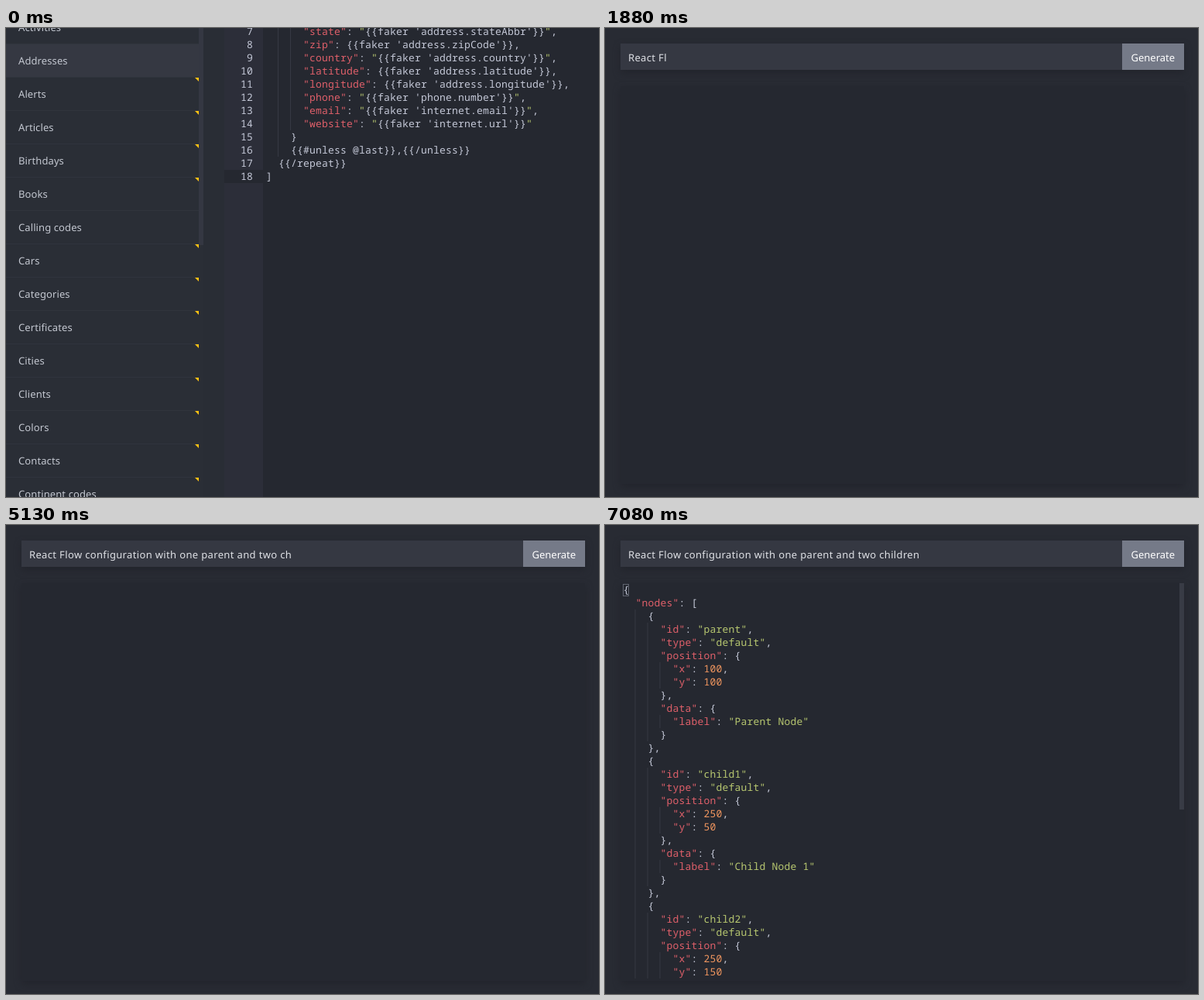
An HTML page that plays this animation: 766x605 px, repeating every 8000 ms.

```html
<!DOCTYPE html>
<html lang="en">
<head>
<meta charset="utf-8">
<title>JSON generator</title>
<style>
  html, body { margin: 0; width: 100%; height: 100%; overflow: hidden; background: #2a2e36; }
  svg { display: block; width: 766px; height: 605px; }
  text { font: 13px "Noto Sans", "Open Sans", sans-serif; fill: #c3c7d0; white-space: pre; text-rendering: geometricPrecision; }
  .item { letter-spacing: .1px; }
  .prompt { letter-spacing: .35px; fill: #dfe1e6; }
  .label { fill: #fff; }
  .code text { font-family: "Noto Sans Mono", "DejaVu Sans Mono", monospace; letter-spacing: .2px; fill: #c5c9d8; }
  .number { text-anchor: end; }
  .key { fill: #e0606a; }
  .string { fill: #b8c870; }
  .value { fill: #f0965f; }
  .plain tspan { fill: inherit; }
  .guide { fill: #363943; }
  .field { fill: #353842; }
  .shadow { filter: drop-shadow(0 4px 5px rgba(30, 32, 40, .65)); }
</style>
</head>
<body>
<svg viewBox="0 0 766 605">
  <rect width="766" height="605" fill="#2a2e36"/>

  <g id="templates">
    <rect x="255" width="27" height="605" fill="#292d35"/>
    <rect x="282" width="50" height="605" fill="#2c2e39"/>
    <rect x="332" width="434" height="605" fill="#252830"/>
    <rect x="282" y="183" width="50" height="17" fill="#252830"/>
    <rect class="field" y="20" width="249" height="43"/>
    <rect x="249" width="6" height="280" fill="#343742"/>
    <g id="list"></g>
    <g id="templateCode" class="code"></g>
  </g>

  <g id="generator">
    <rect width="766" height="605" fill="#282b33"/>
    <rect id="bar" class="field shadow" x="20" y="20" width="728" height="34"/>
    <rect class="shadow" x="20" y="75" width="728" height="513" fill="#252830"/>
    <text id="prompt" class="prompt" x="30" y="43"></text>
    <g id="button">
      <rect id="buttonFace" x="668" y="20" width="80" height="34"/>
      <text class="label" x="679.5" y="43">Generate</text>
    </g>
    <g id="spinner" fill="none" stroke-width="2">
      <circle cx="740" cy="38" r="6.3" stroke="#555963"/>
      <path d="M733.7 38A6.3 6.3 0 0 1 742 32" stroke="#b4b7bf"/>
    </g>
    <g id="result" class="code">
      <rect x="23.5" y="76.5" width="7" height="15" fill="none" stroke="#60646f"/>
    </g>
    <rect id="thumb" x="742" y="75" width="6" height="292" fill="#383b45"/>
  </g>
</svg>

<script>
const LOOP = 8000, FRAME = 90, LINE = 17, COLUMN = 8;
const $ = id => document.getElementById(id);

function add(parent, tag, attrs, content = '') {
  const el = document.createElementNS('http://www.w3.org/2000/svg', tag);
  for (const name in attrs) el.setAttribute(name, attrs[name]);
  el.textContent = content;
  return parent.appendChild(el);
}

// Sidebar
const names = ['Activities', 'Addresses', 'Alerts', 'Articles', 'Birthdays', 'Books', 'Calling codes', 'Cars',
  'Categories', 'Certificates', 'Cities', 'Clients', 'Colors', 'Contacts', 'Continent codes'];
names.forEach((name, i) => {
  const top = 43 * i - 22;
  add($('list'), 'rect', { y: top + 42, width: 249, height: 1, fill: '#30343d' });
  add($('list'), 'text', { class: 'item', x: 16, y: top + 26 }, name);
  if (i > 1 && name !== 'Calling codes')
    add($('list'), 'path', { d: `M244 ${top}h5v5z`, fill: '#fcc212' });
});

// Code listings
const TOKEN = /("[^"]*"(?=:))|("[^"{]*"|")|(\d+)|[^"\d]+/g;

function drawCode(parent, lines, x, top) {
  lines.forEach((line, i) => {
    const y = top + i * LINE;
    const indent = line.search(/\S/);
    for (let col = 2; col < indent; col += 2)
      add(parent, 'rect', { class: 'guide', x: x + col * COLUMN - 1, y, width: 1, height: LINE });
    const text = add(parent, 'text', { x: x + indent * COLUMN, y: y + 13 });
    for (const [token, key, string, value] of line.trim().matchAll(TOKEN))
      add(text, 'tspan', { class: key ? 'key' : string ? 'string' : value ? 'value' : '' }, token);
  });
}

const faker = (key, path, quote = '"') => `      "${key}": ${quote}{{faker '${path}'}}${quote}`;
const template = [
  faker('state', 'address.stateAbbr') + ',',
  faker('zip', 'address.zipCode', '') + ',',
  faker('country', 'address.country') + ',',
  faker('latitude', 'address.latitude', '') + ',',
  faker('longitude', 'address.longitude', '') + ',',
  faker('phone', 'phone.number') + ',',
  faker('email', 'internet.email') + ',',
  faker('website', 'internet.url'),
  '    }',
  '    {{#unless @last}},{{/unless}}',
  '  {{/repeat}}',
  ']'
];
drawCode($('templateCode'), template, 336, -4);
template.forEach((_, i) =>
  add($('templateCode'), 'text', { class: 'number', x: 319, y: 9 + i * LINE }, i + 7));

const node = (id, x, y, label) => ({ id, type: 'default', position: { x, y }, data: { label } });
const flow = { nodes: [
  node('parent', 100, 100, 'Parent Node'),
  node('child1', 250, 50, 'Child Node 1'),
  node('child2', 250, 150, 'Child Node 2')
] };
drawCode($('result'), JSON.stringify(flow, null, 2).split('\n').slice(0, 30), 23.5, 75);

// Typing bursts: start time, then one chunk per frame
const keystrokes = [
  [1340, 'R|e|a|c|t'],
  [1880, ' Fl|o|w'],
  [2240, ' c|o|n|f|ig|u|r|a|ti|on'],
  [3230, ' w|i|t|h| o|n|e'],
  [3960, ' p|a|r|e|nt| a|n|d| t'],
  [4860, 'wo'],
  [5040, ' c|h|i|l|d|re|n']
].flatMap(([start, chunks]) => chunks.split('|').map((chunk, i) => [start + i * FRAME, chunk]));

const show = (id, visible) => $(id).setAttribute('visibility', visible ? 'visible' : 'hidden');

function render(t) {
  const fade = Math.min(1, Math.max(0, (Math.floor((t - 550) / FRAME) + 1) / 9));
  const loading = t >= 6130 && t < 6940;
  const hovered = t >= 5670 && t < 6940;

  $('templates').style.display = t < 370 ? '' : 'none';
  $('generator').style.display = t < 370 ? 'none' : '';
  $('generator').setAttribute('opacity', fade);

  $('prompt').textContent = keystrokes.filter(k => k[0] <= t).map(k => k[1]).join('');
  $('bar').setAttribute('width', loading ? 705 : 728);
  $('button').setAttribute('transform', `translate(${loading ? -23 : 0})`);
  $('buttonFace').setAttribute('fill', hovered ? '#6d7280' : '#757a88');

  const turn = Math.floor((t - 6130) / FRAME) * FRAME * .36;
  show('spinner', loading);
  $('spinner').setAttribute('transform', `rotate(${turn} 740 38)`);

  show('result', t >= 6940);
  $('result').classList.toggle('plain', t < 7030);
  show('thumb', t >= 7080);
}

const start = performance.now();
function tick() {
  render((performance.now() - start) % LOOP);
  requestAnimationFrame(tick);
}
tick();
</script>
</body>
</html>
```
